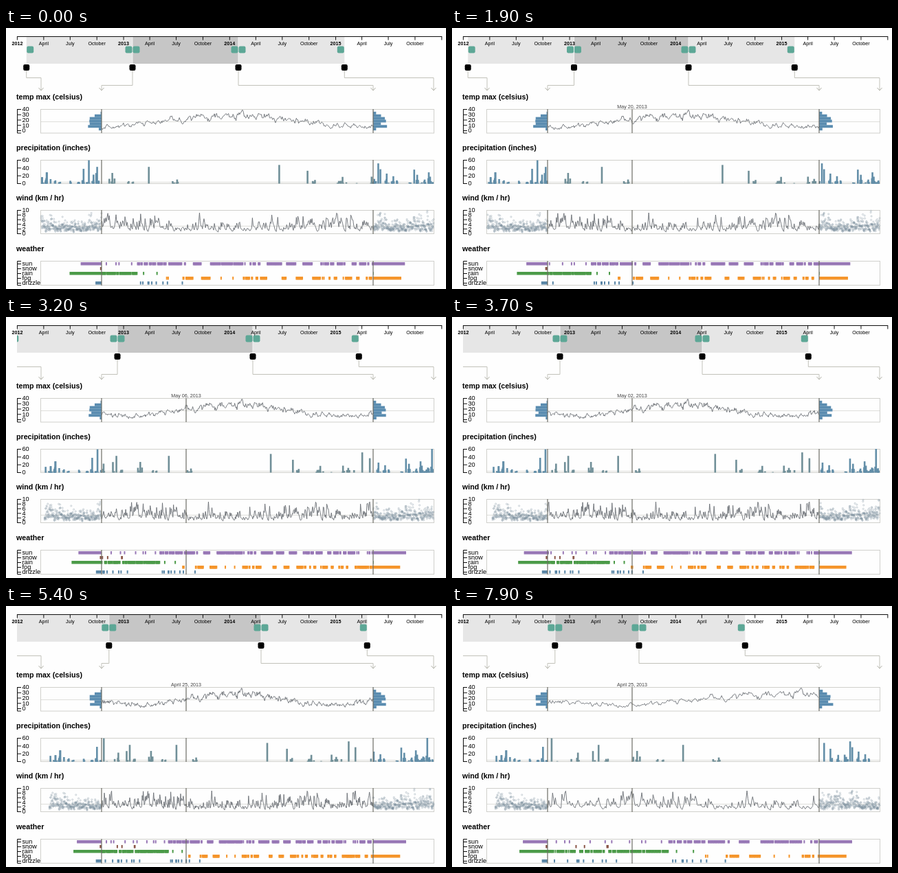
These frames come from a looping animation (640x380 px, 8000 ms). An HTML page with a canvas:

```html
<!DOCTYPE html>
<html lang="en">
<head>
<meta charset="utf-8">
<title>Weather timeline</title>
<style>
html, body { margin: 0; width: 100%; height: 100%; overflow: hidden; background: #fefefe; }
canvas { display: block; width: 640px; height: 380px; }
</style>
</head>
<body>
<canvas id="stage"></canvas>
<script>
const canvas = document.getElementById('stage');
const ratio = window.devicePixelRatio || 1;
canvas.width = 640 * ratio;
canvas.height = 380 * ratio;
const ctx = canvas.getContext('2d');
ctx.scale(ratio, ratio);

const LOOP = 8000, STEP = 100, ZOOM = 1500, DRAG = 7300;
const X0 = 16.4, PX = 0.4226, DAYS = 1461, YEAR = 154.3;
const L = 51, A = 139, B = 534, R = 622, CURSOR = 262;
const FONT = '"Liberation Sans", Arial, sans-serif';
const PAPER = '#fefefe', INK = '#101010', LINE = '#6a6f74', PALE = '#d0d0cc', MEAN = '#dfdfdb';
const BLUE = '#5a8cb0', BAND = '#e6e6e6', FOCUS = '#c6c6c6', GRIP = '#5da796';
const MONTHS = ['January', 'February', 'March', 'April', 'May', 'June', 'July',
  'August', 'September', 'October', 'November', 'December'];

function seeded(s) {
  return () => {
    s = (s + 0x6D2B79F5) | 0;
    let r = Math.imul(s ^ (s >>> 15), 1 | s);
    r = (r + Math.imul(r ^ (r >>> 7), 61 | r)) ^ r;
    return ((r ^ (r >>> 14)) >>> 0) / 4294967296;
  };
}

// ---- data, one value per day; positions are on the top axis ----
const pos = i => X0 + i * PX;
const summer = i => Math.cos((i - 576) / 365.25 * 2 * Math.PI);   // 1 in late July, -1 in late January
const bump = (x, at, width) => Math.exp(-(((x - at) / width) ** 2));
const perDay = fn => Array.from({ length: DAYS }, (_, i) => fn(i, pos(i)));

function makeTemp() {
  const rnd = seeded(11);
  let n = 0;
  return perDay((i, x) => {
    n = n * 0.62 + (rnd() + rnd() - 1) * 6;
    const v = 17 + 10.5 * summer(i) + n * (1 + 0.25 * summer(i))
      - 8 * bump(x, 314.5, 2) + 7 * bump(x, 222.3, 1.5);
    return Math.max(-4, Math.min(38, v));
  });
}

function makeRain() {
  const rnd = seeded(5);
  const storms = [[138, 37], [151.7, 59], [172.9, 42], [210.9, 42], [284.6, 47], [301, 32],
    [351, 51], [356.5, 36], [443, 35], [509, 60]];
  let spell = false;
  const out = perDay((i, x) => {
    const dryYear = x > 176 && x < 335;
    const wet = (dryYear ? 0.45 : 1) * (0.55 - 0.45 * summer(i));
    spell = rnd() < (spell ? 0.72 : 0.14 * wet);
    const amount = -Math.log(1 - rnd()) * (2 + 7 * wet), falls = rnd() < 0.6;
    return spell && falls ? Math.min(amount, 28) : 0;
  });
  for (const [x, v] of storms) out[Math.round((x - X0) / PX)] = v;
  return out;
}

function makeWind() {
  const rnd = seeded(23);
  let w = 3;
  return perDay(i => {
    w = 0.5 * w + 0.1 - Math.log(1 - rnd() * 0.99) * (1.5 - 0.2 * summer(i));
    return Math.max(0.5, Math.min(9.6, w));
  });
}

// 0 sun, 1 snow, 2 rain, 3 fog, 4 drizzle
function makeSky() {
  const rnd = seeded(42);
  let foggy = false;
  const pick = (snow, drizzle, rain) => {
    const u = rnd();
    return u < snow ? 1 : u < snow + drizzle ? 4 : u < snow + drizzle + rain ? 2 : 0;
  };
  return perDay((i, x) => {
    if (x < 150) return pick(x < 60 ? 0.08 : 0, 0.11, 0.45);
    if (x < 180) return pick(0.06, 0.11, 0.72);
    if (x < 204.5) return pick(0.02, 0.02, 0.84);
    if (rnd() < 0.4) foggy = rnd() < (x < 300 ? 0.3 : 0.47);
    return pick(0, x < 222 ? 0.06 : 0.003, 0.005) || (foggy ? 3 : 0);
  });
}

const temp = makeTemp(), rain = makeRain(), wind = makeWind(), sky = makeSky();
const SKY = [['sun', '#9878b6'], ['snow', '#8a5648'], ['rain', '#4b9a48'],
  ['fog', '#f5952b'], ['drizzle', '#5a86a6']];

// ---- motion: [time, left edge, right edge] of the focus ----
const KEYS = [[0, 184, 338], [ZOOM, 184, 338], [2300, 171, 350], [3700, 157, 364],
  [5000, 149.8, 371], [DRAG, 149.8, 371], [7900, 149.8, 272]];

function view(t) {
  const k = Math.max(1, KEYS.findIndex(key => key[0] >= t));
  const [t0, b0, c0] = KEYS[k - 1], [t1, b1, c1] = KEYS[k];
  const p = (t - t0) / (t1 - t0);
  return [b0 + (b1 - b0) * p, c0 + (c1 - c0) * p];
}

function dateText(t) {
  const [b, c] = view(Math.min(t, DRAG));
  const x = b + (CURSOR - A) / (B - A) * (c - b);
  const d = new Date(Date.UTC(2012, 0, 1 + Math.floor((x - X0) / PX + 1.9)));
  return MONTHS[d.getUTCMonth()] + ' ' + String(d.getUTCDate()).padStart(2, '0') + ', ' + d.getUTCFullYear();
}

// ---- drawing helpers ----
function rect(x, y, w, h, color) {
  ctx.fillStyle = color;
  ctx.fillRect(x, y, w, h);
}

function path(points, color, width = 1) {
  ctx.beginPath();
  points.forEach(([x, y], i) => i ? ctx.lineTo(x, y) : ctx.moveTo(x, y));
  ctx.strokeStyle = color;
  ctx.lineWidth = width;
  ctx.stroke();
}

function text(s, x, y, size, align = 'left', bold = false, color = '#000') {
  ctx.font = (bold ? 'bold ' : '') + size + 'px ' + FONT;
  ctx.textAlign = align;
  ctx.fillStyle = color;
  ctx.fillText(s, x, y);
}

function knob(x, y, size, color) {
  ctx.beginPath();
  ctx.roundRect(x - size / 2, y - size / 2, size, size, 2.2);
  ctx.fillStyle = color;
  ctx.fill();
}

function clipped(x, y, w, h, draw) {
  ctx.save();
  ctx.beginPath();
  ctx.rect(x, y, w, h);
  ctx.clip();
  draw();
  ctx.restore();
}

// Calls fn(day, x) for each day inside [from, to], mapped onto [x1, x2]
function eachDay(from, to, x1, x2, fn) {
  const i0 = Math.max(0, Math.ceil((from - X0) / PX));
  const i1 = Math.min(DAYS - 1, Math.floor((to - X0) / PX));
  for (let i = i0; i <= i1; i++) fn(i, x1 + (pos(i) - from) / (to - from) * (x2 - x1));
}

function timeAxis() {
  path([[16, 12.5], [634, 12.5]], INK, 1.2);
  for (let q = 0; q <= 16; q++) {
    const year = 2012 + (q >> 2), month = (q % 4) * 3;
    const x = pos((Date.UTC(year, month, 1) - Date.UTC(2012, 0, 1)) / 864e5);
    path([[x, 12], [x, 17.5]], INK);
    if (q < 16) text(month ? MONTHS[month] : year, x, 25, 7.2, 'center', !month);
  }
}

function brush(a, b, c, d) {
  clipped(16, 0, 620, 100, () => {
    rect(a, 13, d - a, 39, BAND);
    rect(b, 13, c - b, 39, FOCUS);
    for (const x of [b, c]) rect(x - 0.5, 13, 1, 39, '#f2f2f2');
    for (const x of [a + 5.5, b - 5.5, b + 5.5, c - 5.5, c + 5.5, d - 5.5]) knob(x, 31.5, 10, GRIP);
    for (const [x, y, end] of [[a, 72, L], [b, 83, A], [c, 83, B], [d, 72, R]]) {
      path([[x, 62], [x, y + 0.5], [end, y + 0.5], [end, 91]], '#c2c2ba');
      path([[end - 3.5, 87], [end, 91], [end + 3.5, 87]], '#b2b2a8');
      knob(x, 57.5, 9, '#000');
    }
  });
}

function frame(title, top, bottom, ticks, mean) {
  text(title, 15, top - 14, 10.67, 'left', true);
  ctx.strokeStyle = PALE;
  ctx.lineWidth = 1;
  ctx.strokeRect(L - 0.5, top + 0.5, R - L + 1, bottom - top);
  if (mean) path([[L, mean], [R, mean]], MEAN);
  path([[22, top + 0.5], [16.5, top + 0.5], [16.5, bottom + 0.5], [22, bottom + 0.5]], INK);
  for (const [label, y] of ticks) {
    path([[16, y + 0.5], [22, y + 0.5]], INK);
    text(label, 23.5, y + 3.3, 9.2);
  }
}

function seams(top, bottom, cursor) {
  for (const x of cursor ? [A, CURSOR, B] : [A, B]) path([[x, top], [x, bottom + 1]], '#6c6c64', 1.2);
}

function scaleTicks(max, step, y) {
  const out = [];
  for (let v = 0; v <= max; v += step) out.push([v, y(v)]);
  return out;
}

function detail(data, y, b, c) {
  const pts = [];
  eachDay(b, c, A, B, (i, x) => pts.push([x, y(data[i])]));
  path(pts, LINE, 0.9);
}

// Draws a bar against the seam, growing away from the detail view
const sideBar = (x, y, w, h, color) => rect(x === A ? x - w : x, y, w, h, color);

const tempY = v => 149 - v * 0.775;
const rainY = v => 226 - v * 34 / 60;
const windY = v => 299 - v * 3.4;

function drawTemp(a, b, c, d, cursor) {
  frame('temp max (celsius)', 118, 152.5, scaleTicks(40, 10, tempY), 136.5);
  const bars = (from, to, x) => {
    const bins = {};
    eachDay(from, to, 0, 1, i => {
      const k = Math.floor(temp[i] / 5);
      bins[k] = (bins[k] || 0) + 1;
    });
    for (const k in bins) sideBar(x, tempY(k * 5 + 5), bins[k] * 0.24, 4, BLUE);
  };
  clipped(L, 118, R - L, 35, () => {
    bars(a, b, A);
    bars(c, d, B);
  });
  detail(temp, tempY, b, c);
  seams(118, 152, cursor);
}

function drawRain(a, b, c, d, cursor) {
  frame('precipitation (inches)', 192, 226, scaleTicks(60, 20, rainY), 224.5);
  const bars = (from, to, x1, x2, color) => clipped(x1, 190, x2 - x1, 37, () => {
    eachDay(from, to, x1, x2, (i, x) => {
      if (rain[i]) rect(x - 1.3, rainY(rain[i]), 2.6, 226.5 - rainY(rain[i]), color);
    });
  });
  bars(a, b, L, A, '#628ea8');
  bars(b, c, A, B, '#708f98');
  bars(c, d, B, R, '#628ea8');
  seams(192, 226, cursor);
}

function drawWind(a, b, c, d, cursor) {
  frame('wind (km / hr)', 265, 299, scaleTicks(10, 2, windY), 288.5);
  ctx.lineWidth = 0.7;
  ctx.strokeStyle = 'rgba(120,140,155,.5)';
  for (const [from, to, x1, x2] of [[a, b, L, A], [c, d, B, R]]) {
    eachDay(from, to, x1, x2, (i, x) => {
      ctx.beginPath();
      ctx.arc(x, windY(wind[i]), 1.1, 0, 7);
      ctx.stroke();
    });
  }
  detail(wind, windY, b, c);
  seams(265, 299, cursor);
}

function drawSky(a, b, c, d, cursor) {
  const rowY = k => 343 + k * 7;
  frame('weather', 339, 374, SKY.map(([name], k) => [name, rowY(k)]));
  const totals = (from, to, x) => {
    const n = SKY.map(() => 0);
    eachDay(from, to, 0, 1, i => n[sky[i]]++);
    const sum = n.reduce((s, v) => s + v, 0);
    n.forEach((v, k) => sideBar(x, rowY(k) - 2, v / sum * (A - L), 4.5, SKY[k][1]));
  };
  totals(a, b, A);
  totals(c, d, B);
  clipped(A, 339, B - A, 36, () => {
    eachDay(b, c, A, B, (i, x) => rect(x - 1, rowY(sky[i]) - 2, 2, 4.5, SKY[sky[i]][1]));
  });
  seams(339, 374, cursor);
}

function draw(t) {
  const [b, c] = view(t), a = b - YEAR, d = c + YEAR, cursor = t > ZOOM;
  rect(0, 0, 640, 380, PAPER);
  brush(a, b, c, d);
  timeAxis();
  for (const panel of [drawTemp, drawRain, drawWind, drawSky]) panel(a, b, c, d, cursor);
  if (cursor) text(dateText(t), CURSOR, 116.6, 7.15, 'center', false, '#444');
}

function tick() {
  const t = performance.now() % LOOP;
  draw(Math.floor(t / STEP) * STEP);
  requestAnimationFrame(tick);
}
tick();
</script>
</body>
</html>
```
